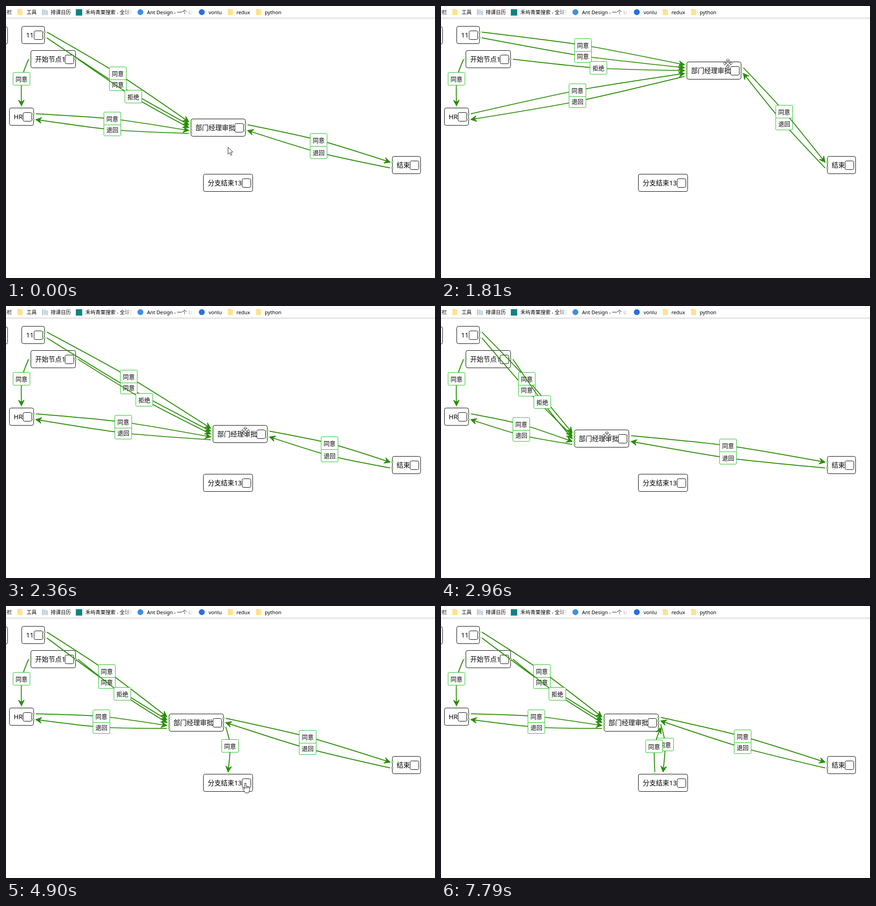
Write an HTML page with a canvas that moves like this. It is 940x596 px and loops after 8070 ms.

```html
<!DOCTYPE html>
<html lang="zh">
<head>
<meta charset="utf-8">
<title>流程图</title>
<style>
html, body { margin: 0; width: 100%; height: 100%; overflow: hidden; background: #fff; }
canvas { display: block; width: 940px; height: 596px; }
</style>
</head>
<body>
<canvas id="stage" width="940" height="596"></canvas>
<script>
const ctx = document.getElementById('stage').getContext('2d');
const FONT = '"Noto Sans", "Noto Sans CJK SC", "Noto Sans CJK", sans-serif';
const LOOP = 8070;
const GREEN = '#2a8d05', LABEL = '#18c018', INK = '#000';
const CURVE = 9.5, MARGIN = 5, NEAR = 80, ARROW = 12;

// Moments of the story, in ms
const GRAB = 1254, RELEASE = 3470, PULL = 3780, FIRST_LINK = 4900, PULL_BACK = 5750, SECOND_LINK = 7100;

// The picture advances in even steps inside these spans: start, end, step count
const spans = [[0, 0, 1], [700, RELEASE, 20], [PULL, 4620, 6], [FIRST_LINK, 7790, 21]];

const point = (x, y) => ({ x, y });
const dragStops = [point(405, 247), point(538, 122), point(453, 261), point(292, 271), point(357, 236)];
const rest = point(486, 309), square = point(463, 256), branchSquare = point(524, 388);

// Pointer moves after the drag: start, end, destination
const glides = [
  [RELEASE, PULL, point(464, 252)],
  [PULL, 4620, branchSquare],
  [5700, 6280, point(475, 284)],
  [6280, 6700, point(470, 259)],
  [SECOND_LINK, 7720, point(862, 610)]
];

const node = (x, y, w, text) => ({ x, y, w, h: 38, text });
const eleven = node(34, 44, 50, '11');
const start = node(54, 97, 98, '开始节点1');
const hr = node(7, 223, 53, 'HR');
const manager = node(405, 247, 119, '部门经理审批');
const finish = node(846, 329, 62, '结束');
const branch = node(432, 368, 108, '分支结束13');
const nodes = [node(-60, 45, 63, ''), eleven, start, hr, manager, finish, branch];

const ramp = (t, a, b) => Math.min(1, Math.max(0, (t - a) / (b - a)));
const mix = (p, q, k) => point(p.x + (q.x - p.x) * k, p.y + (q.y - p.y) * k);
const snap = p => point(Math.round(p.x), Math.round(p.y));

function stepTime(t) {
  const [a, b, n] = spans.filter(s => s[0] <= t).pop();
  const step = (b - a) / n || 1;
  return Math.min(b, a + Math.floor((t - a + 5) / step) * step);
}

function managerAt(t) {
  const pos = ramp(t, GRAB, RELEASE) * (dragStops.length - 1);
  const i = Math.min(Math.floor(pos), dragStops.length - 2);
  return snap(mix(dragStops[i], dragStops[i + 1], pos - i));
}

function pointerAt(t) {
  const grip = mix(point(90, 3), point(71, 13), ramp(t, 1808, 2100));
  const held = point(manager.x + grip.x, manager.y + grip.y);
  const begin = mix(rest, held, ramp(t, 700, GRAB));
  return snap(glides.reduce((p, [a, b, to]) => mix(p, to, ramp(t, a, b)), begin));
}

function pointerKind(t) {
  const within = (a, b) => t >= a && t < b;
  if (within(GRAB - 150, PULL - 50) || within(SECOND_LINK, SECOND_LINK + 100)) return 'move';
  if (within(PULL, PULL + 100) || within(FIRST_LINK, PULL_BACK)) return 'hand';
  return 'arrow';
}

// Anchor i of n on one side of a node; fx, fy are its place as a fraction of the box.
function anchor(box, side, i = 1, n = 1) {
  const f = i / (n + 1);
  const fx = side === 'L' ? 0 : side === 'R' ? 1 : f;
  const fy = side === 'T' ? 0 : f;
  return { x: box.x + box.w * fx, y: box.y + box.h * fy, fx, fy };
}

const free = p => ({ x: p.x, y: p.y, fx: 0.5, fy: 0.5 });

function inset(a) {
  const off = f => f === 0 ? -MARGIN : f === 1 ? MARGIN : 0;
  return point(a.x + off(a.fx), a.y + off(a.fy));
}

function controlPoint(s, e, from, to) {
  const mid = mix(s, e, 0.5);
  if (Math.hypot(e.x - s.x, e.y - s.y) <= NEAR) return mid;
  const right = s.x <= e.x, down = s.y <= e.y;
  const facing = right ? from.fx === 1 && to.fx === 0 : from.fx === 0 && to.fx === 1;
  if (facing) mid.y += from.fy < 0.5 ? -CURVE : CURVE;
  else {
    mid.x += right === down ? CURVE : -CURVE;
    mid.y -= CURVE;
  }
  return mid;
}

function bezier(s, c, e, t) {
  const u = 1 - t, a = u * u * u, b = 3 * u * t, d = t * t * t;
  return point(a * s.x + b * c.x + d * e.x, a * s.y + b * c.y + d * e.y);
}

function poly(points) {
  ctx.beginPath();
  points.forEach(([x, y]) => ctx.lineTo(x, y));
  ctx.closePath();
}

function paint(fill, stroke, width = 1) {
  ctx.fillStyle = fill;
  ctx.strokeStyle = stroke;
  ctx.lineWidth = width;
  ctx.fill();
  ctx.stroke();
}

function box(x, y, w, h, r, stroke) {
  ctx.beginPath();
  ctx.roundRect(x, y, w, h, r);
  paint('#fff', stroke);
}

function write(text, x, cy, size, align = 'left', color = INK) {
  ctx.font = size + 'px ' + FONT;
  ctx.textAlign = align;
  ctx.fillStyle = color;
  ctx.fillText(text, x, cy + size * 0.37);
}

function drawNode(n) {
  box(n.x, n.y, n.w, n.h, 4, INK);
  if (!n.text) return;
  write(n.text, n.x + 9.5, n.y + n.h / 2 + 0.5, 14.5);
  box(n.x + n.w - 23, n.y + 10, 19, 19, 3, INK);
}

function drawArrow(s, c, e) {
  const back = 1 - ARROW / (3 * Math.hypot(e.x - c.x, e.y - c.y));
  const p = bezier(s, c, e, Math.max(0, back));
  ctx.save();
  ctx.translate(e.x, e.y);
  ctx.rotate(Math.atan2(e.y - p.y, e.x - p.x));
  poly([[0, 0], [-ARROW, -ARROW / 2], [-ARROW * 0.623, 0], [-ARROW, ARROW / 2]]);
  ctx.lineJoin = 'round';
  paint(GREEN, GREEN, 1.6);
  ctx.restore();
}

function drawDot(a) {
  ctx.beginPath();
  ctx.arc(a.x, a.y, 1.8, 0, 7);
  paint('#fff', GREEN);
}

function connect(from, to, text) {
  const s = inset(from), e = inset(to), c = controlPoint(s, e, from, to);
  ctx.beginPath();
  ctx.moveTo(s.x, s.y);
  ctx.bezierCurveTo(c.x, c.y, c.x, c.y, e.x, e.y);
  ctx.strokeStyle = GREEN;
  ctx.lineWidth = 2;
  ctx.stroke();
  if (text) drawArrow(s, c, e);

  const w = text ? 37 : 11, h = text ? 28 : 11;
  const m = bezier(s, c, e, 0.5);
  const corner = snap(point(m.x - w / 2 - 0.5, m.y - h / 2 - 0.5));
  box(corner.x, corner.y, w, h, 2, LABEL);
  if (text) write(text, corner.x + w / 2, corner.y + h / 2 + 0.5, 13, 'center');
}

function drawLinks(t, pointer) {
  const extra = t >= SECOND_LINK ? 2 : t >= FIRST_LINK ? 1 : 0;
  const inLeft = i => anchor(manager, 'L', i, 5);
  const outRight = i => anchor(manager, 'R', i, 2 + extra);
  const links = [
    [anchor(start, 'L'), anchor(hr, 'T'), '同意'],
    [anchor(eleven, 'R', 2, 2), inLeft(2), '同意'],
    [anchor(eleven, 'R', 1, 2), inLeft(1), '同意'],
    [anchor(start, 'R'), inLeft(3), '拒绝'],
    [inLeft(5), anchor(hr, 'R', 2, 2), '退回'],
    [anchor(hr, 'R', 1, 2), inLeft(4), '同意'],
    [anchor(finish, 'L', 2, 2), outRight(2), '退回'],
    [outRight(1), anchor(finish, 'L', 1, 2), '同意']
  ];
  if (extra) links.push([outRight(3), anchor(branch, 'T'), '同意']);
  if (extra > 1) links.push([anchor(branch, 'T', 1, 2), outRight(4), '同意']);
  if (t > PULL && t < FIRST_LINK) links.push([free(square), free(pointer), '']);
  if (t > PULL_BACK && t < SECOND_LINK) links.push([free(branchSquare), free(pointer), '']);

  links.forEach(l => connect(...l));
  links.forEach(([from, to]) => {
    drawDot(from);
    if (extra < 2 || to.y !== branch.y) drawDot(to);
  });
  if (extra > 1) drawDot(anchor(branch, 'T', 2, 2));
}

const pointers = {
  arrow() {
    poly([[0, 0], [0, 15], [3.5, 12], [6, 17.5], [8.5, 16.4], [6, 11], [10.5, 10.5]]);
    paint('#fff', '#222');
  },
  move() {
    const arm = [[-1, -2], [-1, -6], [-4, -6], [0, -10], [4, -6], [1, -6], [1, -2]];
    const turn = k => ([x, y]) => [[x, y], [-y, x], [-x, -y], [y, -x]][k];
    poly([0, 1, 2, 3].flatMap(k => arm.map(turn(k))));
    paint('#fff', '#333');
  },
  hand() {
    poly([[-1.5, 0], [1.5, 0], [1.5, 6], [9, 8], [9.5, 14], [7, 21],
      [0, 21], [-6, 12], [-5, 10], [-1.5, 13]]);
    paint('#fff', '#222');
    ctx.beginPath();
    for (let x = 1.5; x < 7; x += 2.5) {
      ctx.moveTo(x, 7);
      ctx.lineTo(x, 11);
    }
    ctx.stroke();
  }
};

function rect(x, y, w, h, color) {
  ctx.fillStyle = color;
  ctx.fillRect(x, y, w, h);
}

function folder(x) {
  rect(x, 7, 7, 4, '#f0cf62');
  rect(x, 8, 11, 12, '#ffe38c');
}

function page(x) {
  rect(x, 7, 9, 13, '#dfe8ee');
  rect(x, 7, 1.5, 13, '#9fb8c8');
  for (let y = 10; y < 18; y += 3) rect(x + 3, y, 5, 1, '#9fb8c8');
  rect(x + 9, 10, 4, 10, '#c3d4de');
}

function disc(x, color) {
  ctx.beginPath();
  ctx.arc(x, 13.5, 6.5, 0, 7);
  ctx.fillStyle = color;
  ctx.fill();
}

function fadeText(text, x, end) {
  ctx.save();
  ctx.beginPath();
  ctx.rect(x, 0, end - x, 26);
  ctx.clip();
  const g = ctx.createLinearGradient(end - 22, 0, end, 0);
  g.addColorStop(0, INK);
  g.addColorStop(1, '#fff');
  write(text, x, 14, 11, 'left', g);
  ctx.restore();
}

function drawBookmarks() {
  const label = (text, x, align) => write(text, x, 14, 11, align);
  label('签栏', 13, 'right');
  folder(25);
  label('工具', 45);
  page(79);
  label('排课日历', 98);
  rect(153, 7, 14, 14, '#0c8484');
  fadeText('禾屿青栗搜索 - 全球搜', 174, 277);
  disc(294.5, '#3f8fe0');
  fadeText('Ant Design - 一个 UI', 309, 410);
  disc(429, '#2a6fe0');
  label('vonlu', 444);
  folder(486);
  label('redux', 505);
  folder(548);
  label('python', 567);
  rect(0, 26, 940, 1, '#b8b8b8');
}

function draw(now) {
  const t = stepTime(now % LOOP);
  Object.assign(manager, managerAt(t));
  const pointer = pointerAt(t);

  rect(0, 0, 940, 596, '#fff');
  drawBookmarks();

  ctx.save();
  ctx.translate(0.5, 0.5);
  nodes.forEach(drawNode);
  drawLinks(t, pointer);
  ctx.translate(pointer.x, pointer.y);
  pointers[pointerKind(t)]();
  ctx.restore();
}

const begun = performance.now();
function frame() {
  draw(performance.now() - begun);
  requestAnimationFrame(frame);
}
frame();
</script>
</body>
</html>
```
